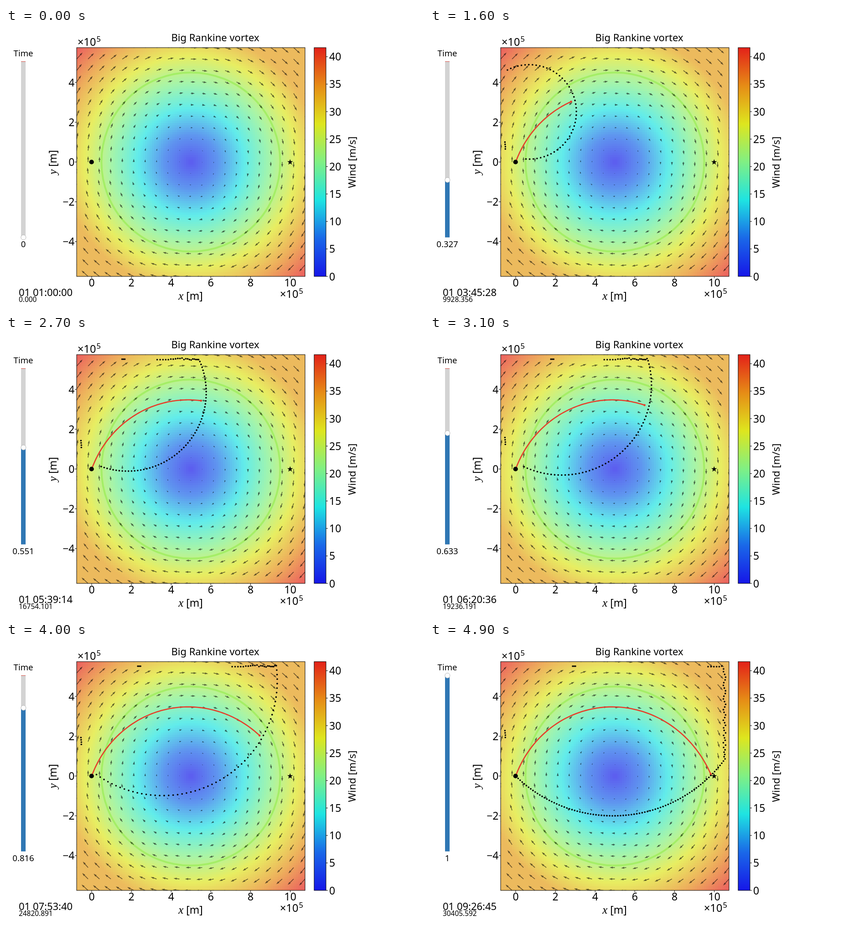
Recreate the animation shown at these times as an HTML page with a canvas. Size 917 px wide and 611 px high, loop 5 s.

```html
<!DOCTYPE html>
<html lang="en">
<head>
<meta charset="utf-8">
<title>Big Rankine vortex</title>
<style>
  html, body { margin: 0; width: 100%; height: 100%; overflow: hidden; background: #fff; }
  canvas, svg { position: absolute; left: 0; top: 0; width: 917px; height: 611px; }
  text { font-family: "Noto Sans", "Open Sans", sans-serif; font-size: 23px; fill: #000; }
  .mid { text-anchor: middle; }
  .title, .clock { font-size: 22px; }
  .small { font-size: 18.5px; }
  .tiny { font-size: 15.4px; }
  .var { font-family: "Liberation Serif", "Noto Serif", serif; font-style: italic; font-size: 25px; }
</style>
</head>
<body>
<canvas id="plot" width="917" height="611"></canvas>
<svg id="labels" viewBox="0 0 917 611">
  <text class="mid title" x="459" y="29">Big Rankine vortex</text>
  <text class="mid small" x="38" y="62">Time</text>
  <text class="mid small" id="value" x="38" y="480"></text>
  <text class="clock" id="clock" x="28" y="587"></text>
  <text class="tiny" id="secs" x="28" y="600"></text>
  <text class="mid" x="405" y="595"><tspan class="var">x</tspan> [m]</text>
  <text class="mid" transform="translate(111 294) rotate(-90)"><tspan class="var">y</tspan> [m]</text>
  <text class="mid title" transform="translate(767 294) rotate(-90)">Wind [m/s]</text>
</svg>
<script>
const STEPS = 49, STEP_MS = 100, TOTAL = 30405.5916;
const LEFT = 155, TOP = 43, SIZE = 501, CX = 405.5, CY = 293.5, UNIT = 43.57;
const px = x => 188 + UNIT * x;
const py = y => CY - UNIT * y;
const $ = id => document.getElementById(id);
const ctx = $('plot').getContext('2d');

// ---- colours: evenly spaced stops from calm to strong wind ----
const VMAX = 41.65;
const RAMP = ['1616e8', '1a68e8', '1ee4e2', '80f084', 'dee61e', 'e68c16', 'e32119']
  .map(hex => [0, 2, 4].map(i => parseInt(hex.substr(i, 2), 16)));

function rampColor(v) {
  const q = v / VMAX * (RAMP.length - 1);
  const i = Math.min(RAMP.length - 2, Math.floor(q));
  return RAMP[i].map((c, n) => c + (RAMP[i + 1][n] - c) * (q - i));
}

function speed(dx, dy) {
  const v = 5.2 * Math.hypot(dx, dy) / UNIT;
  return Math.min(v, dx * dy < 0 ? 33.4 : VMAX);
}

// ---- drawing helpers ----
function disc(c, x, y, r, fill) {
  c.fillStyle = fill;
  c.beginPath();
  c.arc(x, y, r, 0, 7);
  c.fill();
}

function line(c, x1, y1, x2, y2) {
  c.beginPath();
  c.moveTo(x1, y1);
  c.lineTo(x2, y2);
  c.stroke();
}

function arrow(c, x, y, dx, dy) {
  const len = 0.057 * Math.hypot(dx, dy);
  const s = 1.45 * Math.min(1, len / 7.25);
  const neck = len - 4.5 * s, back = len - 5 * s;
  c.save();
  c.translate(x, y);
  c.rotate(Math.atan2(dx, -dy));
  c.beginPath();
  [[0, -s / 2], [neck, -s / 2], [back, -1.5 * s], [len, 0],
   [back, 1.5 * s], [neck, s / 2], [0, s / 2]].forEach(p => c.lineTo(...p));
  c.fill();
  c.restore();
}

// ---- fixed picture ----
function drawField(c) {
  const n = 100, cell = SIZE / n;
  const edge = i => Math.round(i * cell);
  for (let j = 0; j < n; j++) {
    for (let i = 0; i < n; i++) {
      const v = speed((i + 0.5) * cell - SIZE / 2, (j + 0.5) * cell - SIZE / 2);
      c.fillStyle = `rgb(${rampColor(v).map(q => Math.round(q * 0.7 + 76.5))})`;
      c.fillRect(LEFT + edge(i), TOP + edge(j), edge(i + 1) - edge(i), edge(j + 1) - edge(j));
    }
  }
}

function drawArrows(c) {
  c.fillStyle = 'rgba(0,0,0,.6)';
  for (let j = -10; j <= 10; j++) {
    for (let i = -10; i <= 10; i++) {
      const dx = i * 25.05, dy = j * 25.05;
      arrow(c, CX + dx, CY + dy, dx, dy);
    }
  }
}

function drawBase() {
  const cv = document.createElement('canvas');
  cv.width = 917;
  cv.height = 611;
  const c = cv.getContext('2d');
  c.fillStyle = '#fff';
  c.fillRect(0, 0, 917, 611);

  drawField(c);
  c.save();
  c.beginPath();
  c.rect(LEFT, TOP, SIZE, SIZE);
  c.clip();
  c.strokeStyle = 'rgba(160,238,96,.85)';
  c.lineWidth = 4;
  c.beginPath();
  c.arc(CX, CY, 4.5 * UNIT, 0, 7);
  c.stroke();
  drawArrows(c);
  c.restore();

  const bar = c.createLinearGradient(0, TOP + SIZE, 0, TOP);
  RAMP.forEach((rgb, i) => bar.addColorStop(i / (RAMP.length - 1), `rgb(${rgb})`));
  c.fillStyle = bar;
  c.fillRect(676, TOP, 26, SIZE);

  c.strokeStyle = '#000';
  c.lineWidth = 1;
  c.strokeRect(LEFT, TOP, SIZE, SIZE);
  c.strokeRect(676, TOP, 26, SIZE);
  for (let x = 0; x <= 10; x += 2) line(c, px(x), 544, px(x), 548);
  for (let y = -4; y <= 4; y += 2) line(c, 151, py(y), 155, py(y));
  for (let v = 0; v <= 40; v += 5) line(c, 702, 544 - v * 12.03, 706, 544 - v * 12.03);
  return cv;
}

function label(x, y, str, anchor, size = 23) {
  const t = document.createElementNS('http://www.w3.org/2000/svg', 'text');
  t.setAttribute('x', x);
  t.setAttribute('y', y);
  t.setAttribute('text-anchor', anchor);
  t.style.fontSize = size + 'px';
  t.textContent = str;
  $('labels').append(t);
}

function powerLabel(x, y) {
  label(x, y, '×10', 'start', 23.5);
  label(x + 41.5, y - 9, '5', 'start', 16.5);
}

for (let x = 0; x <= 10; x += 2) label(px(x), 566, x, 'middle');
for (let y = -4; y <= 4; y += 2) label(150.5, py(y) + 8.5, y < 0 ? '−' + -y : y, 'end');
for (let v = 0; v <= 40; v += 5) label(709, 552.5 - v * 12.03, v, 'start');
powerLabel(157, 39);
powerLabel(601, 591);

// ---- motion: s runs from 0 to 1, lengths in units of 1e5 m ----
const turn = s => s * (1.65 - 0.1 * s);
const radius = s => s * (7.4 - 0.4 * s);
const reach = s => s * (6.5 + 0.45 * s);
const HEADING = 0.767;

// the start point carried round the vortex
const centre = s => [px(5 - 5 * Math.cos(turn(s))), py(5 * Math.sin(turn(s)))];

function tip(s) {
  const [x, y] = centre(s), a = HEADING - turn(s), r = reach(s) * UNIT;
  return [x + r * Math.cos(a), y - r * Math.sin(a)];
}

// repeatable noise in -1..1
function noise(n) {
  const q = Math.sin(n * 127.1) * 43758.5453;
  return 2 * (q - Math.floor(q)) - 1;
}

const WEST = 164, EAST = 647, NORTH = 54;
const dot = (x, y) => disc(ctx, x, y, 1.8, '#000');

function drawFront(s) {
  const [x0, y0] = centre(s), r = radius(s) * UNIT;
  const first = 189 + 22 * Math.sin(Math.PI * s ** 0.75);
  const start = Math.acos(Math.max(-1, Math.min(1, (first - x0) / r)));
  let step = Math.PI / 10;
  while (step * r > 10) step /= 2;
  for (let a = 0; a < 2 * Math.PI - step / 2; a += step) {
    const x = x0 + r * Math.cos(start - a), y = y0 + r * Math.sin(start - a);
    if (x < WEST || y < NORTH) break;
    dot(x > EAST ? EAST - 1 + 2.5 * Math.sin(y * 1.9) : x, y);
  }
  if (s > 0.07) drawWest(s);
  const rise = y0 - NORTH;
  if (s > 0.38 && r > rise) drawNorth(s, x0 + Math.sqrt(r * r - rise * rise));
}

function drawWest(s) {
  for (let i = 0; i < 4; i++) dot(165 + 0.6 * noise(i), 277 + 5 * i - 83 * s);
}

// dots held at the upper border, drifting with the wind
function drawNorth(s, cross) {
  const from = 620 * s - 10, end = Math.min(cross, 642);
  let n = 0;
  for (let x = from; x < end; x += 6.5 - 3.5 * Math.min(1, (x - from) / 88)) {
    dot(x, n < 5 ? NORTH : 52.7 + 2.3 * noise(n));
    n++;
  }
  for (let i = -1; i <= 1; i++) dot(186 + 130 * s + 3 * i, 53);
}

function drawPath(s) {
  ctx.strokeStyle = '#e63e2a';
  ctx.lineWidth = 2.6;
  ctx.lineJoin = 'round';
  ctx.beginPath();
  for (let i = 0; i <= 80; i++) ctx.lineTo(...tip(s * i / 80));
  ctx.stroke();
  disc(ctx, ...tip(s), 2.3, '#e63e2a');
}

function drawStar(x, y, r) {
  ctx.fillStyle = '#000';
  ctx.beginPath();
  for (let i = 0; i < 10; i++) {
    const q = i % 2 ? r * 0.4 : r, a = i * Math.PI / 5;
    ctx.lineTo(x + q * Math.sin(a), y - q * Math.cos(a));
  }
  ctx.fill();
}

function drawSlider(s) {
  const y = 458.5 - 385 * s;
  ctx.fillStyle = '#d3d3d3';
  ctx.fillRect(33, 73, 10, 385.5);
  ctx.fillStyle = '#2f77b4';
  ctx.fillRect(33, y, 10, 458.5 - y);
  ctx.fillStyle = '#d9534a';
  ctx.fillRect(33, 73, 10, 1);
  disc(ctx, 38.3, y, 5.5, '#fff');
  ctx.strokeStyle = '#b5b5b5';
  ctx.lineWidth = 1;
  ctx.stroke();
}

const base = drawBase();
const two = n => String(Math.floor(n)).padStart(2, '0');

function draw(s) {
  const t = TOTAL * s;
  ctx.drawImage(base, 0, 0);
  drawSlider(s);
  if (s > 0) {
    drawPath(s);
    drawFront(s);
  }
  disc(ctx, 187.7, 293.5, 5.1, '#000');
  drawStar(623.3, 293.8, 6.6);
  $('value').textContent = +s.toFixed(3);
  $('clock').textContent = `01 ${two(1 + t / 3600)}:${two(t / 60 % 60)}:${two(t % 60)}`;
  $('secs').textContent = t.toFixed(3);
}

const begin = performance.now();
let shown = -1;
function tick() {
  const k = Math.floor((performance.now() - begin) / STEP_MS) % (STEPS + 1);
  if (k !== shown) draw((shown = k) / STEPS);
  requestAnimationFrame(tick);
}
tick();
</script>
</body>
</html>
```
